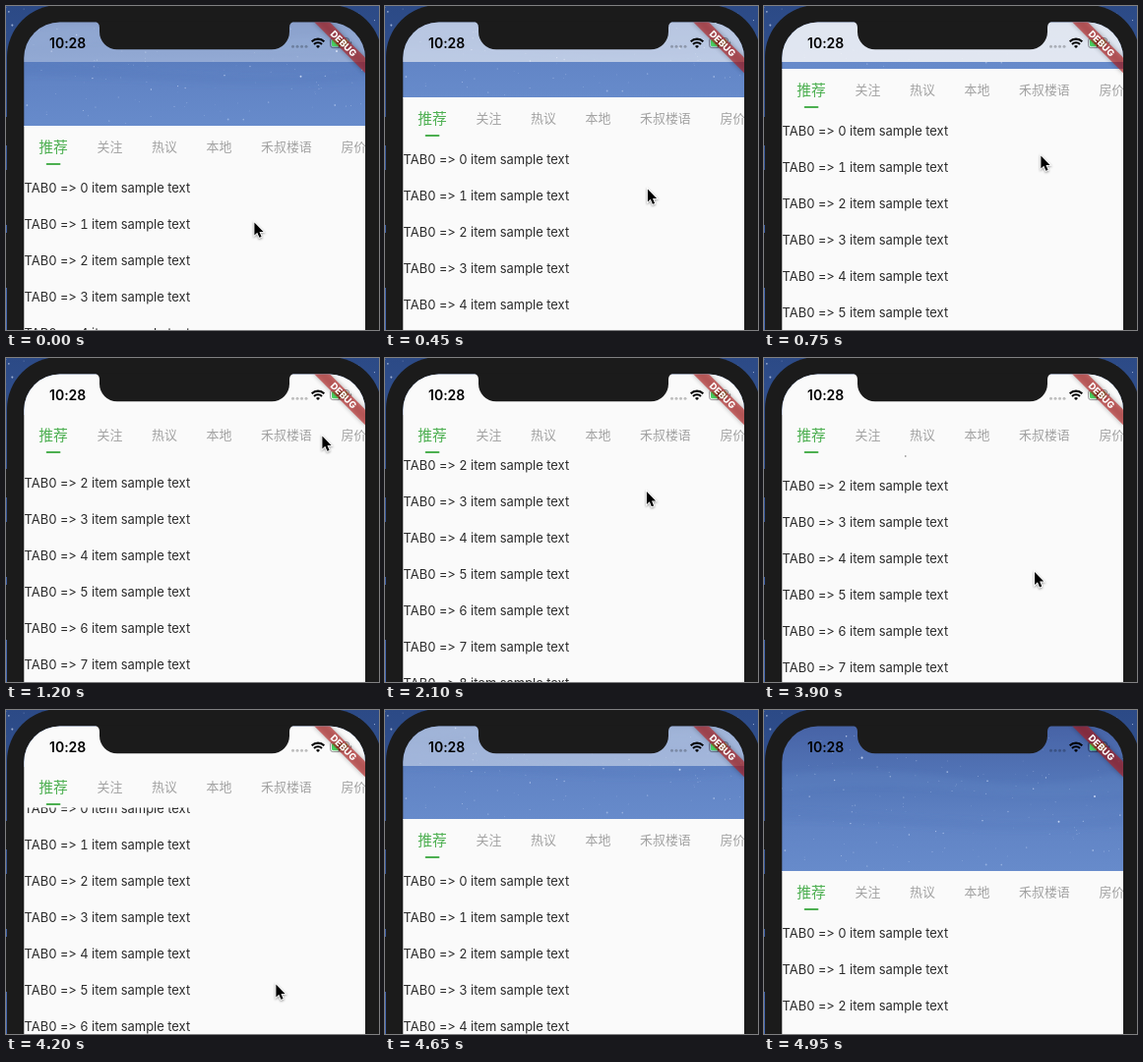
An HTML page for the animation above (6450 ms loop, 379 px wide and 330 px high).

```html
<!DOCTYPE html>
<html lang="zh-CN">
<head>
<meta charset="utf-8">
<title>Pinned tabs</title>
<style>
  html, body { margin: 0; width: 100%; height: 100%; overflow: hidden; background: #2f4f8f; }
  svg { display: block; }
  text { font-family: Inter, sans-serif; font-variant-ligatures: none; font-feature-settings: "calt" 0; }
  #tabs text { font-family: "Noto Sans CJK SC", "Noto Sans CJK", sans-serif; font-size: 12.95px; fill: #a2a2a2; }
  #tabs text.on { font-size: 14.8px; fill: #4caf50; }
  #list text { font-size: 12.95px; fill: #2b2b2b; font-variant-numeric: tabular-nums; }
  #cursor { filter: drop-shadow(0 1px 1px rgba(0, 0, 0, .4)); }
</style>
</head>
<body>
<svg width="379" height="330" viewBox="0 0 379 330">
  <defs>
    <linearGradient id="night" x2="0" y2="1">
      <stop stop-color="#2c4a86"/><stop offset="1" stop-color="#4468b4"/>
    </linearGradient>
    <linearGradient id="dusk" x2="0" y2="1">
      <stop stop-color="#4763a6"/><stop offset=".4" stop-color="#5477b9"/>
      <stop offset=".7" stop-color="#6184c5"/><stop offset="1" stop-color="#678bcb"/>
    </linearGradient>
    <filter id="soft" x="-20%" y="-50%" width="140%" height="200%"><feGaussianBlur stdDeviation="2.5"/></filter>
    <clipPath id="screen"><rect x="18.3" y="16.5" width="346.7" height="400" rx="36.5"/></clipPath>
    <clipPath id="below"><rect x="18" y="42.5" width="348" height="330"/></clipPath>
  </defs>

  <rect width="379" height="330" fill="url(#night)"/>
  <g id="outside"></g>
  <path d="M0 113h2v29h-2zM0 167h2v56h-2zM0 231h2v56h-2z" fill="#1b1b1b"/>
  <rect x="1" y="-1" width="381" height="450" rx="53" fill="#1b1b1b"/>

  <g clip-path="url(#screen)">
    <g id="sky">
      <rect x="18" y="16" width="348" height="149" fill="url(#dusk)"/>
      <g filter="url(#soft)">
        <path d="M18 66Q110 56 200 70T366 62V84Q280 92 190 82T18 84Z" fill="#6284c4" opacity=".3"/>
        <path d="M18 100Q120 106 210 112T366 106V118Q270 126 180 120T18 112Z" fill="#4f73b8" opacity=".2"/>
      </g>
      <g id="stars"></g>
    </g>
    <rect id="bar" x="18" y="16" width="348" height="41" fill="#fafafa"/>
    <g id="sheet">
      <rect x="18" width="348" height="330" fill="#fafafa"/>
      <g clip-path="url(#below)"><g id="list"></g></g>
      <g id="tabs"><rect x="40.7" y="38" width="14.8" height="2" rx="1" fill="#4caf50"/></g>
    </g>

    <text x="44" y="42.8" font-size="14" font-weight="600">10:28</text>
    <g opacity=".24">
      <circle cx="291.5" cy="41.2" r="1.5"/><circle cx="296" cy="41.2" r="1.5"/>
      <circle cx="300.5" cy="41.2" r="1.5"/><circle cx="305" cy="41.2" r="1.5"/>
    </g>
    <g fill="none" stroke="#000" stroke-width="2.1">
      <path d="M310.7 36.2a9 9 0 0 1 12.6 0M313 38.9a5.7 5.7 0 0 1 8 0"/>
      <path d="M315 41a2.8 2.8 0 0 1 4 0L317 43Z" fill="#000" stroke="none"/>
    </g>
    <rect x="329.6" y="32.6" width="19" height="10" rx="2.6" fill="none" stroke="#000" stroke-opacity=".4"/>
    <path d="M350 36v3.4q1.3-.4 1.3-1.7t-1.3-1.7" opacity=".4"/>
    <rect x="331" y="34" width="16.2" height="7.2" rx="1.4" fill="#4cd964"/>
    <path d="M340.6 32.8L335.4 38.2H338.8L337.6 42.6L342.8 37H339.4Z"/>

    <g transform="translate(365.2 16) rotate(45)">
      <rect x="-37" y="25.9" width="74" height="11.1" opacity=".3" filter="url(#soft)"/>
      <rect x="-37" y="25.9" width="74" height="11.1" fill="#b71c1c" fill-opacity=".6"/>
      <text y="34.8" text-anchor="middle" font-size="9.4" font-weight="800" fill="#fff">DEBUG</text>
    </g>
  </g>
  <path d="M89 15.5Q95 16 95 22V26A18 18 0 0 0 113 44.3H270A18 18 0 0 0 288 26V22Q288 16 294 15.5Z" fill="#1b1b1b"/>

  <path id="cursor" d="M.4 .4V13.4L3.3 10.7L5.4 15.8L7.6 14.9L5.5 9.9H9.6Z"
        stroke="#fff" stroke-width="1.8" paint-order="stroke"/>
</svg>
<script>
const LOOP = 6450, STEP = 150, TOP = 164, PIN = 107, ROW = 37;
const $ = id => document.getElementById(id);

function add(parent, tag, attrs, label = '') {
  const node = document.createElementNS('http://www.w3.org/2000/svg', tag);
  for (const key in attrs) node.setAttribute(key, attrs[key]);
  node.textContent = label;
  parent.append(node);
}

let seed = 11;
const random = () => (seed = seed * 16807 % 2147483647) / 2147483647;

function scatter(parent, count, x, y, w, h) {
  for (let i = 0; i < count; i++)
    add(parent, 'circle', {
      cx: x + random() * w, cy: y + random() * h, r: 0.35 + random() ** 4 * 0.7,
      fill: '#dfeaff', opacity: 0.2 + random() * 0.6
    });
}
scatter($('outside'), 110, 0, 0, 379, 60);
scatter($('stars'), 170, 18, 16, 347, 146);

const tabs = [['推荐', 33.3], ['关注', 92.5], ['热议', 148], ['本地', 203.5], ['禾叔楼语', 259], ['房价', 340.4]];
tabs.forEach(([name, x], i) => add($('tabs'), 'text', { x, y: i ? 26 : 26.6, class: i ? '' : 'on' }, name));

for (let i = 0; i < 10; i++)
  add($('list'), 'text', { x: 18.5, y: 67.6 + i * ROW }, `TAB0 => ${i} item sample text`);

// time, scroll offset, pointer x, pointer y
const keys = [
  [0, 42, 252, 220], [150, 42, 252, 220], [750, 100, 281, 152], [1200, 174, 321, 79],
  [1500, 192, 330, 66], [1950, 192, 330, 66], [2250, 192, 201, 205], [2400, 192, 201, 205],
  [3000, 192, 261, 73], [3150, 192, 261, 73], [3450, 192, 275, 187], [3750, 192, 275, 187],
  [4200, 127, 274, 279], [4650, 53, 274, 375], [4950, 0, 274, 440], [LOOP, 0, 274, 440]
];

function pose(t) {
  const i = keys.findIndex(key => key[0] > t), a = keys[i - 1], b = keys[i];
  const k = (t - a[0]) / (b[0] - a[0]);
  return a.map((v, n) => v + (b[n] - v) * k);
}

const move = (id, x, y) => $(id).setAttribute('transform', `translate(${x} ${y})`);

function draw(now) {
  const [, scroll, x, y] = pose(Math.floor(now % LOOP / STEP) * STEP);
  const header = Math.min(scroll, PIN);
  move('sky', 0, -header);
  move('sheet', 0, TOP - header);
  move('list', 0, header - scroll);
  move('cursor', x, y);
  $('bar').setAttribute('opacity', Math.min(1, scroll / 120));
  requestAnimationFrame(draw);
}
draw(0);
</script>
</body>
</html>
```
